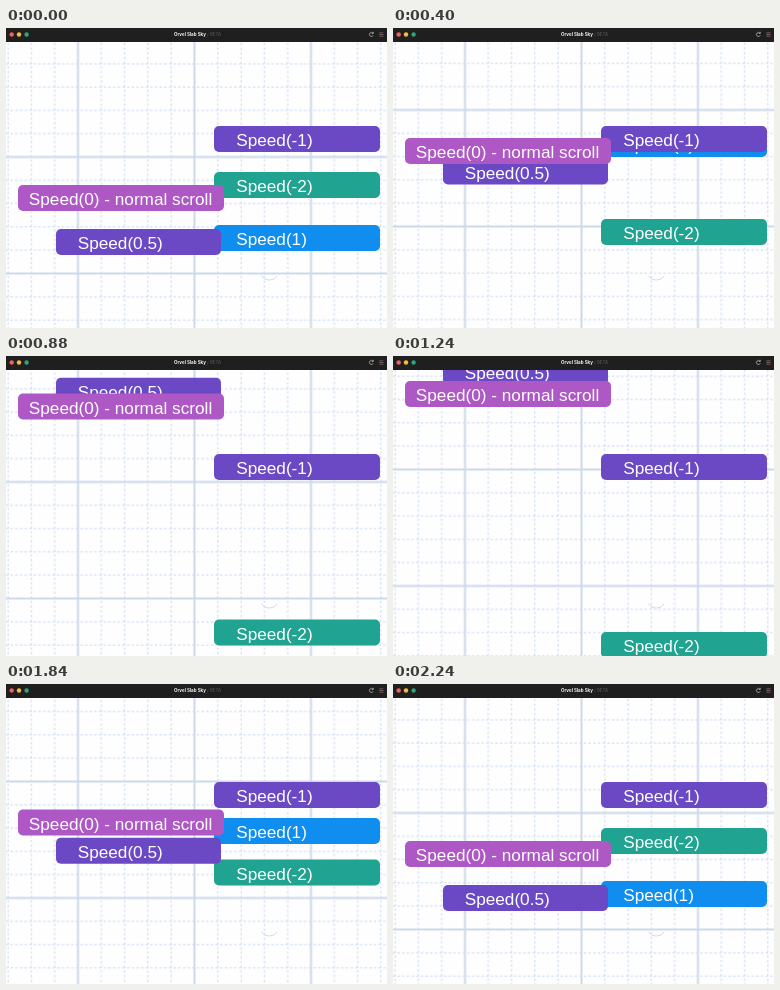
Animation of 381x300 px, one loop 2.28 s. Source, as an HTML page:

```html
<!DOCTYPE html>
<html lang="en">
<head>
<meta charset="utf-8">
<title>Scroll speeds</title>
<style>
  html, body { margin: 0; width: 100%; height: 100%; overflow: hidden; background: #fefeff; }
  #stage { position: relative; width: 381px; height: 300px; overflow: hidden; --d: 0; }
  svg { position: absolute; left: 0; top: 0; }
  #grid { transform: translateY(calc(var(--d) * -1px)); }

  .bar {
    position: absolute; left: 208px; top: var(--y);
    width: 166px; height: 26px; box-sizing: border-box; padding-left: 22.2px;
    border-radius: 5px; background: var(--c); color: #fff;
    font: 17.2px/28px "Liberation Sans", Arial, sans-serif; white-space: nowrap;
    transform: translateY(calc(var(--d) * var(--rate) * 1px));
  }
  .left { left: 50px; width: 165px; padding-left: 21.7px; }
  .wide { left: 12px; width: 206px; padding-left: 10.8px; }

  #touch {
    position: absolute; left: 255px; top: 318px; width: 16px; height: 16px;
    border-radius: 50%; background: rgba(228, 234, 236, .5);
    transform: translateY(calc(var(--d) * -1px));
  }

  header { position: absolute; left: 0; top: 0; width: 381px; height: 13.5px; background: #1f1f1f; }
  header p {
    position: absolute; left: 168px; top: 0; margin: 0; color: #f4f4f4;
    font: bold 4.5px/13px Inter, "Liberation Sans", sans-serif; white-space: pre;
  }
  header span { color: #5a5a5a; font-weight: 400; }
</style>
</head>
<body>
<div id="stage">
  <svg id="grid" width="381" height="450">
    <defs>
      <pattern id="cell" x="13.75" y="70.75" width="116.5" height="116.5" patternUnits="userSpaceOnUse">
        <g fill="none" stroke="#c6d8ef" stroke-width="1" stroke-dasharray="2.5 2.16">
          <path d="M0 11.65h116.5M0 34.95h116.5M0 81.55h116.5M0 104.85h116.5"/>
          <path d="M11.65 0v116.5M34.95 0v116.5M81.55 0v116.5M104.85 0v116.5"/>
        </g>
        <path d="M0 58.25h116.5M58.25 0v116.5" stroke="#cbd9ea" stroke-width="2"/>
      </pattern>
    </defs>
    <rect width="381" height="450" fill="url(#cell)"/>
  </svg>
  <svg width="381" height="300">
    <path id="mark" d="M255.5 247.5Q258 252 263.5 252T271 248" fill="none" stroke="#d3dbe6" stroke-width="1"/>
  </svg>

  <div class="bar" style="--y:197px; --rate:-2; --c:#0f8ef0">Speed(1)</div>
  <div class="bar" style="--y:144px; --rate:1; --c:#20a391">Speed(-2)</div>
  <div class="bar" style="--y:98px; --rate:0; --c:#6b49c5">Speed(-1)</div>
  <div class="bar left" style="--y:200.5px; --rate:-1.5; --c:#6b49c5">Speed(0.5)</div>
  <div class="bar wide" style="--y:157px; --rate:-1; --c:#ae58c5">Speed(0) - normal scroll</div>
  <div id="touch"></div>

  <header>
    <svg width="381" height="13">
      <circle cx="5.7" cy="6.5" r="2.2" fill="#f4605a"/>
      <circle cx="13" cy="6.5" r="2.2" fill="#f5bd3e"/>
      <circle cx="20.6" cy="6.5" r="2.2" fill="#2fa37c"/>
      <path d="M367 5.2A2 2 0 1 0 367.3 7.2M367.3 3.8V5.4H365.7" fill="none" stroke="#c4c4c4" stroke-width=".7"/>
      <path d="M373.3 4.8h4.2M373.3 6.5h4.2M373.3 8.2h4.2" stroke="#8b6868" stroke-width=".8"/>
    </svg>
    <p>Orvel Slab Sky <span>/ BETA</span></p>
  </header>
</div>

<script>
  const LOOP = 2280, STEP = 40;
  // time (ms), scroll distance (px), velocity (px/ms)
  const keys = [
    [0, 0, 0], [400, 47, .17], [880, 119.5, .09], [1240, 132, 0],
    [1560, 84, -.21], [1840, 31.5, -.135], [2240, 0, 0], [LOOP, 0, 0]
  ];
  const stage = document.getElementById('stage');
  const touch = document.getElementById('touch');
  const mark = document.getElementById('mark');

  // Cubic Hermite interpolation between the keys
  function scrollAt(t) {
    const i = keys.findIndex(k => k[0] > t);
    const [t0, d0, v0] = keys[i - 1], [t1, d1, v1] = keys[i];
    const span = t1 - t0, u = (t - t0) / span;
    const ease = u * u * (3 - 2 * u);
    return d0 + (d1 - d0) * ease
      + span * v0 * u * (1 - u) ** 2
      - span * v1 * u * u * (1 - u);
  }

  function draw() {
    const t = Math.floor(performance.now() % LOOP / STEP) * STEP;
    const pressed = t >= 1280 && t < 1600;
    stage.style.setProperty('--d', scrollAt(t).toFixed(2));
    touch.style.opacity = pressed ? 1 : 0;
    mark.style.opacity = pressed ? 0 : 1;
    requestAnimationFrame(draw);
  }
  draw();
</script>
</body>
</html>
```
